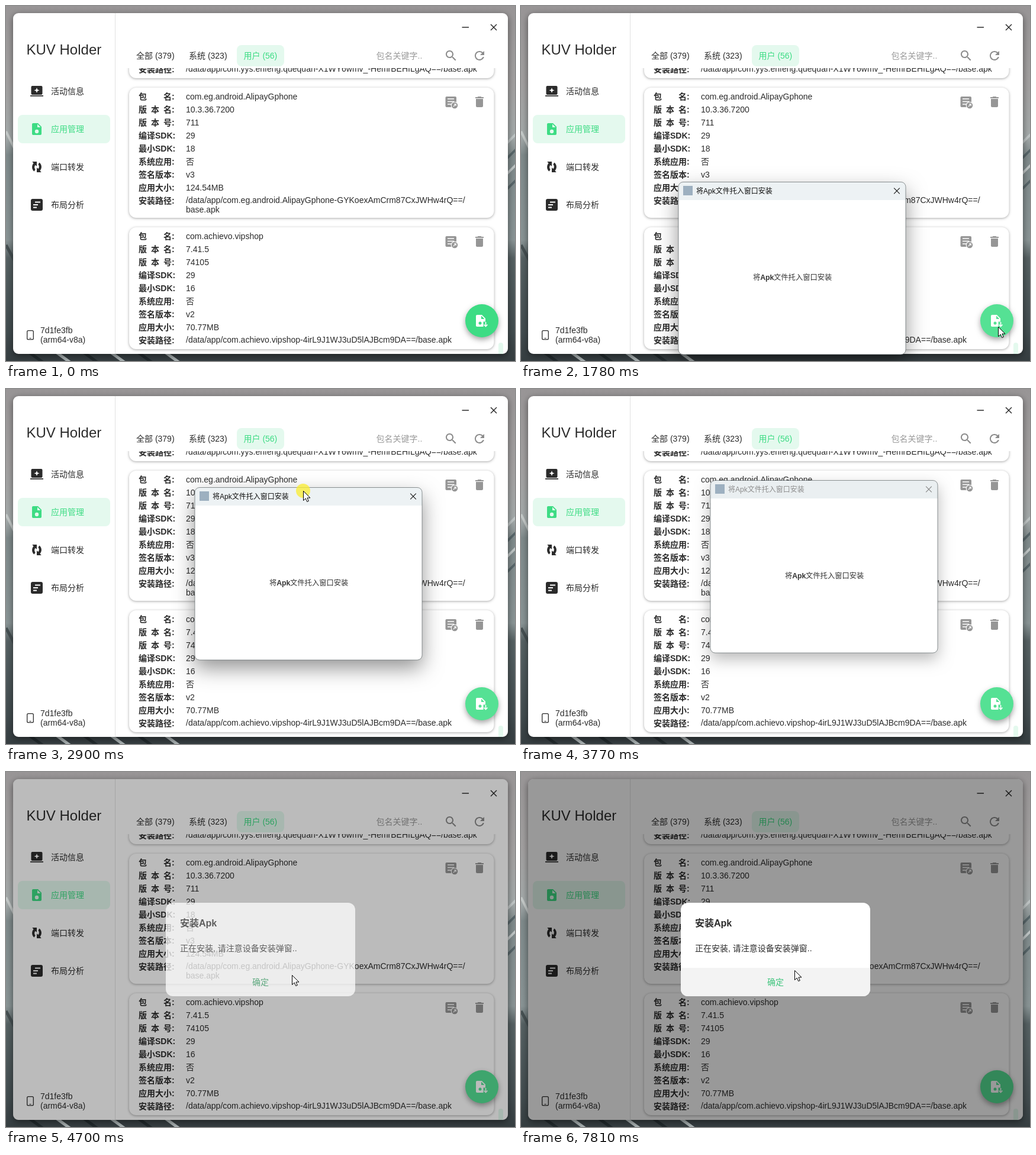
An HTML page with a canvas that plays this animation: 860x600 px, repeating every 8000 ms.

```html
<!DOCTYPE html>
<html lang="zh-CN">
<head>
<meta charset="utf-8">
<title>KUV Holder</title>
<style>
html, body { margin: 0; width: 100%; height: 100%; overflow: hidden; background: #8b8b8b; }
canvas { display: block; width: 860px; height: 600px; }
</style>
</head>
<body>
<canvas id="stage" width="860" height="600"></canvas>
<script>
const LOOP = 8000;
const GREEN = '#3ddc84', MINT = '#e4f9ee', INK = '#2b2b2b', GREY = '#969696';
const FONT = '"Liberation Sans", "Noto Sans CJK SC", "Noto Sans CJK", sans-serif';
const c = document.getElementById('stage').getContext('2d');

const ICON = {
  search: new Path2D('M15.5 14h-.79l-.28-.27C15.41 12.59 16 11.11 16 9.5 16 5.91 13.09 3 9.5 3S3 5.91 3 9.5 5.91 16 9.5 16c1.61 0 3.09-.59 4.23-1.57l.27.28v.79l5 4.99L20.49 19l-4.99-5zm-6 0C7.01 14 5 11.99 5 9.5S7.01 5 9.5 5 14 7.01 14 9.5 11.99 14 9.5 14z'),
  refresh: new Path2D('M17.65 6.35C16.2 4.9 14.21 4 12 4c-4.42 0-7.99 3.58-7.99 8s3.57 8 7.99 8c3.73 0 6.84-2.55 7.73-6h-2.08c-.82 2.33-3.04 4-5.65 4-3.31 0-6-2.69-6-6s2.69-6 6-6c1.66 0 3.14.69 4.22 1.78L13 11h7V4l-2.35 2.35z'),
  trash: new Path2D('M6 19c0 1.1.9 2 2 2h8c1.1 0 2-.9 2-2V7H6v12zM19 4h-3.5l-1-1h-5l-1 1H5v2h14V4z'),
  file: new Path2D('M6 2c-1.1 0-1.99.9-1.99 2L4 20c0 1.1.89 2 1.99 2H18c1.1 0 2-.9 2-2V8l-6-6H6zm7 7V3.5L18.5 9H13z'),
  spark: new Path2D('M12 5.5l1.2 3.3 3.3 1.2-3.3 1.2L12 14.5l-1.2-3.3L7.5 10l3.3-1.2z'),
  swap: new Path2D('M12 3v8L9.6 8.7C7.6 11 7.7 14 9.6 16.2L7.6 19.6C3.2 15.800 3 9.800 6.600 5.700L4.300 3zM12 21v-8l2.400 2.300C16.400 13 16.300 10 14.400 7.800L16.400 4.400C20.800 8.200 21 14.200 17.400 18.300L19.700 21z'),
  pointer: new Path2D('M.5.5V16.500L4.200 13L6.700 18.500L9.300 17.400L6.900 12H12z')
};

// [time, x, y]
const POINTER = [
  [260, 827, 590], [330, 822, 568], [400, 816, 552], [470, 813, 545], [540, 813, 542],
  [1640, 813, 542], [1710, 810, 542], [1780, 806, 542], [1850, 782, 524], [2060, 622, 402],
  [2270, 470, 312], [2360, 437, 301], [2480, 449, 303], [2550, 470, 263], [2620, 492, 222],
  [2760, 500, 185], [2950, 503, 168], [3110, 503, 162], [3180, 503, 160], [3840, 503, 160],
  [3840, 140, 480], [3930, 300, 420], [4020, 430, 362], [4110, 483, 343], [4950, 483, 343],
  [5370, 494, 391], [5440, 499, 402], [5650, 507, 423], [6190, 507, 423], [6460, 484, 387],
  [6560, 484, 387], [6680, 462, 345], [6750, 452, 331], [7040, 452, 331], [7150, 452, 338],
  [7700, 452, 338], [7800, 462, 335]
];

const clamp = v => Math.max(0, Math.min(1, v));
const ramp = (t, from, to) => clamp((t - from) / (to - from));
const within = (t, from, to) => t >= from && t < to;

function pointerAt(t) {
  let a = POINTER[0];
  for (const b of POINTER) {
    if (t < b[0]) {
      const k = ramp(t, a[0], b[0]);
      return [Math.round(a[1] + (b[1] - a[1]) * k), Math.round(a[2] + (b[2] - a[2]) * k)];
    }
    a = b;
  }
  return [a[1], a[2]];
}

function box(x, y, w, h, r, fill) {
  c.beginPath();
  c.roundRect(x, y, w, h, r);
  if (fill) { c.fillStyle = fill; c.fill(); }
}

function disc(x, y, r, fill) {
  c.beginPath();
  c.arc(x, y, r, 0, 7);
  c.fillStyle = fill;
  c.fill();
}

function line(color, width, ...p) {
  c.beginPath();
  c.moveTo(p[0], p[1]);
  for (let i = 2; i < p.length; i += 2) c.lineTo(p[i], p[i + 1]);
  c.strokeStyle = color;
  c.lineWidth = width;
  c.stroke();
}

function text(s, x, y, color = INK, size = 14, weight = 400) {
  c.font = `${weight} ${size}px ${FONT}`;
  c.fillStyle = color;
  c.fillText(s, x, y);
}

function icon(name, x, y, color) {
  c.save();
  c.translate(x, y);
  c.fillStyle = color;
  c.fill(ICON[name], 'evenodd');
  c.restore();
}

function shadowed(color, blur, dy, draw) {
  c.save();
  c.shadowColor = color;
  c.shadowBlur = blur;
  c.shadowOffsetY = dy;
  draw();
  c.restore();
}

function cross(x, y, r, color, w = 1.2) {
  line(color, w, x - r, y - r, x + r, y + r);
  line(color, w, x + r, y - r, x - r, y + r);
}

function wallpaper() {
  const g = c.createLinearGradient(0, 0, 0, 600);
  [[0, '#989596'], [.22, '#a3a1a1'], [.37, '#a4aaaa'], [.42, '#7f8a8b'],
   [.66, '#899495'], [.71, '#566163'], [.92, '#424c4f'], [1, '#353d40']]
    .forEach(s => g.addColorStop(...s));
  c.fillStyle = g;
  c.fillRect(0, 0, 860, 600);
  for (let i = 0; i < 6; i++) {
    const x = 40 + i * 46;
    line(i % 2 ? '#a9b1b2' : '#222a2d', 5, x, 586, x + 22, 602);
  }
  line('#c6cbca', 4, 0, 212, 14, 240);
  line('#465052', 5, 0, 404, 14, 430);
  for (let i = 0; i < 4; i++) line(i % 2 ? '#58666a' : '#c0c6c6', 4, 846, 232 + i * 26, 862, 216 + i * 26);
}

const LABELS = ['包名:', '版本名:', '版本号:', '编译SDK:', '最小SDK:', '系统应用:', '签名版本:', '应用大小:', '安装路径:'];

function label(s, y) {
  const n = s.length;
  if (n > 4) return text(s, 224, y, INK, 14, 700);
  text(s[0], 224, y, INK, 14, 700);
  if (n === 4) text(s[1], 245, y, INK, 14, 700);
  text(s.slice(-2), 266, y, INK, 14, 700);
}

function card(y, h, values) {
  shadowed('rgba(0,0,0,.34)', 4, 1, () => box(208, y, 616.5, h, 12, '#fff'));
  values.forEach((v, i) => {
    label(LABELS[i], y + 20 + i * 22);
    v.split('\n').forEach((s, j) => text(s, 304, y + (i === 8 ? 19 : 20) + i * 22 + j * 16));
  });
  box(742.5, y + 15, 18.5, 18, 2, GREY);
  for (const [dy, w] of [[19, 11], [23.500, 11], [28, 7]]) line('#fff', 1.7, 746, y + dy, 746 + w, y + dy);
  disc(758, y + 30, 6.300, '#fff');
  disc(758, y + 30, 5.200, GREY);
  line('#fff', 1.2, 755.8, y + 32.200, 760, y + 28);
  line('#fff', 1.2, 757, y + 27.800, 760.2, y + 27.800, 760.2, y + 31);
  icon('trash', 788, y + 12, GREY);
}

function list() {
  c.save();
  c.beginPath();
  c.rect(186, 105, 662, 483);
  c.clip();
  shadowed('rgba(0,0,0,.34)', 4, 1, () => box(208, 40, 616.5, 82, 12, '#fff'));
  text('安装路径:', 224, 112, INK, 14, 700);
  text('/data/app/com.yys.enfeng.quequan-X1WY6wmv_-HemrBEHILgAQ==/base.apk', 304, 111);
  card(138, 220, ['com.eg.android.AlipayGphone', '10.3.36.7200', '711', '29', '18', '否', 'v3', '124.54MB',
    '/data/app/com.eg.android.AlipayGphone-GYKoexAmCrm87CxJWHw4rQ==/\nbase.apk']);
  card(374, 206, ['com.achievo.vipshop', '7.41.5', '74105', '29', '16', '否', 'v2', '70.77MB',
    '/data/app/com.achievo.vipshop-4irL9J1WJ3uD5lAJBcm9DA==/base.apk']);
  c.restore();
  box(832, 569, 8, 19, [4, 4, 0, 0], MINT);
}

function sidebar() {
  line('#e2e2e2', 1, 184.5, 12, 184.5, 588);
  text('KUV Holder', 34.5, 82, INK, 24);
  box(20, 184, 156, 48, 8, MINT);
  ['活动信息', '应用管理', '端口转发', '布局分析'].forEach((s, i) =>
    text(s, 76, 149 + i * 64, i === 1 ? GREEN : INK));

  box(42.5, 135, 19, 15, 2, INK);
  box(41, 151, 22, 1.700, 0, INK);
  icon('spark', 40, 132.500, '#fff');
  icon('file', 40, 196, GREEN);
  disc(52, 212, 3.200, MINT);
  icon('swap', 40, 260, INK);
  box(42, 326, 20, 20, 3, INK);
  line('#fff', 2, 49, 331.5, 58, 331.5);
  line('#fff', 2, 46, 336, 54, 336);
  line('#fff', 2, 46, 340.5, 52, 340.5);

  box(35.7, 548.7, 10.600, 15, 2);
  c.strokeStyle = INK;
  c.lineWidth = 1.3;
  c.stroke();
  line(INK, 1.2, 39.5, 561.5, 42.5, 561.5);
  text('7d1fe3fb', 58, 553);
  text('(arm64-v8a)', 58, 569);
}

function toolbar() {
  line(INK, 1.6, 770.5, 36, 782, 36);
  cross(824, 36, 5, INK, 1.5);
  box(390, 66, 80, 36, 8, MINT);
  text('全部 (379)', 220, 89);
  text('系统 (323)', 309, 89);
  text('用户 (56)', 401.5, 89, GREEN);
  text('包名关键字..', 625.5, 89, '#9b9b9b');
  icon('search', 740, 72, '#8b8b8b');
  icon('refresh', 788, 72, '#8b8b8b');
}

function fab(hover) {
  const fill = hover ? '#55e194' : GREEN;
  shadowed('rgba(0,0,0,.36)', 10, 4, () => disc(804, 532, 28, fill));
  icon('file', 790, 520, '#fff');
  disc(801, 536, 2.500, fill);
  box(806.5, 533.500, 8, 10, 0, fill);
  line('#fff', 1.600, 810.5, 534, 810.5, 541);
  line('#fff', 1.600, 807.5, 538.500, 810.5, 541.500, 813.5, 538.500);
}

function mainWindow(t) {
  shadowed('rgba(0,0,0,.5)', 12, 3, () => box(12, 12, 836, 576, 9, '#fff'));
  c.save();
  box(12, 12, 836, 576, 9);
  c.clip();
  sidebar();
  list();
  toolbar();
  fab(t >= 330);
  c.restore();
}

function dropWindow(t, px, py) {
  const moved = t >= 2480;
  const x = t >= 3180 ? 320 : moved ? px - 183 : 266;
  const y = t >= 3180 ? 155 : moved ? py - 5 : 298;
  const active = t < 3770;
  const k = ramp(t, 1120, 1360);
  c.save();
  c.globalAlpha = k;
  const s = .9 + .1 * k;
  c.translate(x + 192, y + 145);
  c.scale(s, s);
  c.translate(-192, -145);

  shadowed(active ? 'rgba(0,0,0,.42)' : 'rgba(0,0,0,.28)', active ? 34 : 26, active ? 14 : 10,
    () => box(0, 0, 384, 291, 8, '#fff'));
  box(0, 0, 384, 30, [8, 8, 0, 0], active ? '#edf2f4' : '#eaeff1');
  box(0, -.5, 384, 291.500, 8);
  c.strokeStyle = 'rgba(70,80,84,.6)';
  c.lineWidth = 1;
  c.stroke();
  box(8, 6, 16, 16, 0, '#9db0c0');
  text('将Apk文件托入窗口安装', 30, 19, active ? '#111' : '#8d8d8d', 12);
  cross(369, 14.5, 4.800, active ? '#1c1c1c' : '#888', 1.2);
  if (t >= 1430) {
    text('将', 126, 165, '#333', 12.3);
    text('Apk', 138.2, 165, '#333', 12.300, 700);
    text('文件托入窗口安装', 161, 165, '#333', 12.300);
  }
  c.restore();
}

function installDialog(t) {
  const k = ramp(t, 4500, 4800), hover = t >= 6680;
  box(12, 12, 836, 576, 9, `rgba(0,0,0,${.4 * k})`);
  c.save();
  c.globalAlpha = k < 1 ? k * 1.1 > 1 ? 1 : k * 1.1 : 1;
  box(270, 221, 320, 158, 12, '#fff');
  if (hover) box(270, 331, 320, 48, [0, 0, 12, 12], '#f3f3f3');
  text('安装Apk', 294, 261, INK, 16, 700);
  text('正在安装, 请注意设备安装弹窗..', 294, 303);
  text('确定', 416, 360, hover ? '#3cc47b' : '#2b9158');
  c.restore();
}

function pointer(t, x, y) {
  if (within(t, 890, 1030) || within(t, 2550, 3110)) disc(x, y, 12, 'rgba(250,236,50,.76)');
  c.save();
  c.translate(x, y);
  c.fillStyle = '#fff';
  c.strokeStyle = '#000';
  c.lineWidth = 1;
  c.fill(ICON.pointer);
  c.stroke(ICON.pointer);
  c.restore();
}

function frame() {
  const t = performance.now() % LOOP;
  const [px, py] = pointerAt(t);
  wallpaper();
  mainWindow(t);
  if (within(t, 1120, 4570)) dropWindow(t, px, py);
  if (t >= 4570) installDialog(t);
  if (t >= 260 && !within(t, 3770, 3840)) pointer(t, px, py);
  requestAnimationFrame(frame);
}
requestAnimationFrame(frame);
</script>
</body>
</html>
```
